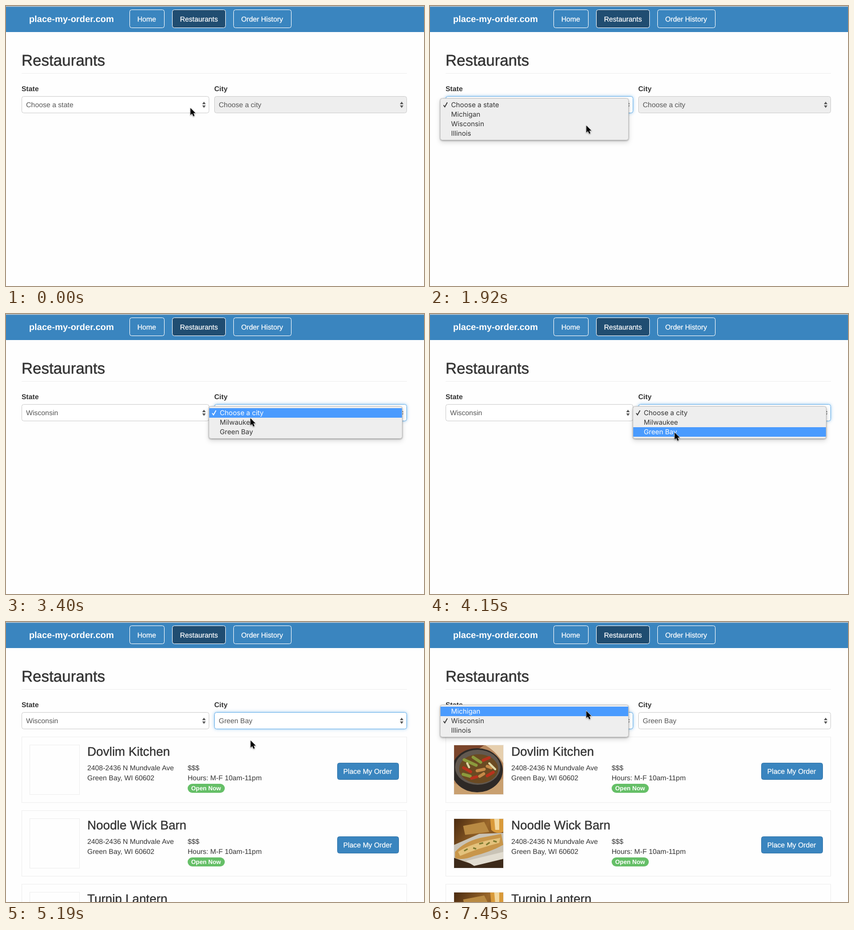
An HTML page that plays this animation: 833 px wide and 559 px high, repeating every 8 s.

```html
<!DOCTYPE html>
<html lang="en">
<head>
<meta charset="utf-8">
<title>Restaurants</title>
<style>
  html, body { margin: 0; width: 100%; height: 100%; overflow: hidden; background: #fefefe; }
  svg { display: block; width: 833px; height: 559px; }
  text { font: 14px "Liberation Sans", Arial, sans-serif; fill: #333; text-rendering: geometricPrecision; white-space: pre; }
  .bold { font-weight: 700; }
  .brand { font-size: 17.8px; font-weight: 700; fill: #fff; }
  .light { fill: #fff; stroke: #fff; stroke-width: .25px; }
  .h1 { font-size: 30.9px; stroke: #333; stroke-width: .5px; }
  .h3 { font-size: 24.7px; stroke: #333; stroke-width: .4px; }
  .value { fill: #555; }
  .badge { font-size: 12px; font-weight: 700; fill: #fff; }
  .item { font: 13.5px Inter, sans-serif; }
  .focus { stroke: #66afe9; filter: drop-shadow(0 0 3px rgba(102, 175, 233, .65)); }
  .panel { filter: drop-shadow(0 1px 1.5px rgba(0, 0, 0, .35)) drop-shadow(0 4px 5px rgba(0, 0, 0, .14)); }
  #cursor { filter: drop-shadow(0 1px 1px rgba(0, 0, 0, .4)); }
</style>
</head>
<body>
<svg id="stage" viewBox="0 0 833 559" xmlns="http://www.w3.org/2000/svg">
  <defs>
    <linearGradient id="wood" x2="1" y2=".6">
      <stop offset="0" stop-color="#4a2a10"/>
      <stop offset=".55" stop-color="#9a672a"/>
      <stop offset="1" stop-color="#5d3512"/>
    </linearGradient>
    <clipPath id="crop"><rect width="98" height="98"/></clipPath>
    <g id="stew" clip-path="url(#crop)">
      <rect width="98" height="98" fill="#b98a60"/>
      <path d="M0 0H60L30 20 0 40Z" fill="#7b452b"/>
      <path d="M62 0H98V36Q84 12 62 0Z" fill="#e6cfae"/>
      <path d="M0 76Q50 104 98 66V98H0Z" fill="#c9a070"/>
      <ellipse cx="46" cy="50" rx="51" ry="44" fill="#2e2926"/>
      <ellipse cx="47" cy="44" rx="45" ry="35" fill="#625950"/>
      <ellipse cx="49" cy="47" rx="39" ry="29" fill="#6b4a22"/>
      <g fill="none" stroke-width="6" stroke-linecap="round">
        <path d="M20 29L44 40M38 24L53 34M18 58L32 62" stroke="#8b9a3c"/>
        <path d="M19 45L33 53M58 30L70 25M66 61L78 54M35 66L45 63" stroke="#b8321d"/>
        <path d="M46 51L60 48M51 62L59 57M66 42L74 45" stroke="#c58a48"/>
        <path d="M70 36L82 48M26 36L30 44" stroke="#dfd8a6" stroke-width="4"/>
      </g>
    </g>
    <g id="bread" clip-path="url(#crop)">
      <rect width="98" height="98" fill="url(#wood)"/>
      <path d="M18 14L60 6 70 26 22 32Z" fill="#b98a43"/>
      <path d="M72 0H98V26Q84 32 74 22Z" fill="#d99a3a"/>
      <path d="M80 0H90V22H82Z" fill="#f3d9a0"/>
      <path d="M0 52L50 30 98 28V80L40 92 0 78Z" fill="#c9c3b6"/>
      <path d="M0 78L40 92 98 78V98H0Z" fill="#3d2a1a"/>
      <path d="M24 84L98 66V80L40 94Z" fill="#e2ddd1"/>
      <path d="M2 66Q20 46 52 38L94 30 98 52Q72 66 40 74 16 84 2 78Z" fill="#c8964a"/>
      <path d="M8 66Q34 48 92 38L90 48Q50 58 12 74Z" fill="#e3c27c"/>
      <path d="M20 64l7-4M38 58l6 2M50 50l8-2M64 52l7-5M78 44l7 2" stroke="#7e7a30" stroke-width="3"/>
    </g>
  </defs>
</svg>
<script>
const NS = 'http://www.w3.org/2000/svg';
const stage = document.getElementById('stage');
const LOOP = 8000, ROW = 19, BLUE = '#3a85bf';

function add(parent, tag, attrs, content = '') {
  const el = document.createElementNS(NS, tag);
  for (const key in attrs) el.setAttribute(key, attrs[key]);
  el.textContent = content;
  return parent.appendChild(el);
}
const label = (parent, x, y, content, cls = '') => add(parent, 'text', { x, y, class: cls }, content);
const rect = (parent, x, y, width, height, fill) => add(parent, 'rect', { x, y, width, height, fill });
// Box with a crisp one-pixel border inside its bounds.
const box = (parent, x, y, w, h, fill, stroke, rx = 0) =>
  add(parent, 'rect', { x: x + .5, y: y + .5, width: w - 1, height: h - 1, fill, stroke, rx });

function drawHeader() {
  rect(stage, 0, 0, 833, 52, BLUE);
  rect(stage, 0, 0, 833, 1.5, '#c3c9ce');
  label(stage, 46, 32, 'place-my-order.com', 'brand');
  [['Home', 246, 70], ['Restaurants', 331, 107], ['Order History', 453, 116]].forEach(([name, x, w], i) => {
    box(stage, x, 7, w, 37, i === 1 ? '#204d71' : 'none', '#fff', 4);
    label(stage, x + 15.7, 31, name, 'light');
  });
  label(stage, 31, 119, 'Restaurants', 'h1');
  rect(stage, 31, 134, 768, 1, '#eee');
}

function makeSelect(x, w, title) {
  label(stage, x, 170, title, 'bold');
  const frame = box(stage, x, 180, w, 34, '#fff', '#ccc', 4);
  const value = label(stage, x + 9, 202, '', 'value');
  const r = x + w;
  add(stage, 'path', { d: `M${r - 14} 196l3.5-5 3.5 5zM${r - 14} 198.5l3.5 5 3.5-5z`, fill: '#555' });
  return { frame, value };
}

function makeCards() {
  const cards = add(stage, 'g', {});
  const pictures = [];
  ['Dovlim Kitchen', 'Noodle Wick Barn', 'Turnip Lantern'].forEach((name, i) => {
    const g = add(cards, 'g', { transform: `translate(31 ${229 + i * 147})` });
    box(g, 0, 0, 768, 132, 'none', '#eee');
    box(g, 16, 16, 100, 100, 'none', '#eee');
    pictures.push(add(g, 'use', { href: i ? '#bread' : '#stew', x: 0, y: 0, transform: 'translate(17 17)' }));
    label(g, 131, 38, name, 'h3');
    label(g, 131, 67, '2408-2436 N Mundvale Ave');
    label(g, 131, 87, 'Green Bay, WI 60602');
    label(g, 331, 67, '$$$');
    label(g, 331, 87, 'Hours: M-F 10am-11pm');
    add(g, 'rect', { x: 331, y: 94, width: 74, height: 18, rx: 9, fill: '#65bf67' });
    label(g, 338, 107, 'Open Now', 'badge');
    box(g, 629, 52, 123, 34, BLUE, '#3274a8', 4);
    label(g, 641, 74, 'Place My Order', 'light');
  });
  return { cards, pictures };
}

function makeMenu(x, top, w, items, checked) {
  const g = add(stage, 'g', {});
  const panel = box(g, x, top - 4, w, items.length * ROW + 8, '#eee', '#c4c4c4', 4);
  panel.setAttribute('class', 'panel');
  const bar = rect(g, x + 1, top, w - 2, ROW, '#4a9bfe');
  const texts = items.map((item, i) => label(g, x + 22, top + 14 + i * ROW, item, 'item'));
  const mark = add(g, 'path', {
    d: `M${x + 7} ${top + 10 + checked * ROW}l2.5 3.5 5-9`, fill: 'none', 'stroke-width': 1.7
  });
  return (visible, hot, alpha) => {
    g.style.display = visible ? '' : 'none';
    g.style.opacity = alpha;
    bar.style.display = hot < 0 ? 'none' : '';
    bar.setAttribute('y', top + hot * ROW);
    texts.forEach((el, i) => el.style.fill = i === hot ? '#fff' : '#333');
    mark.setAttribute('stroke', hot === checked ? '#fff' : '#333');
  };
}

drawHeader();
const selects = { state: makeSelect(31, 374, 'State'), city: makeSelect(415, 384, 'City') };
const { cards, pictures } = makeCards();
const states = ['Michigan', 'Wisconsin', 'Illinois'];
const menus = {
  state: makeMenu(20, 188, 376, ['Choose a state', ...states], 0),
  city: makeMenu(404, 188, 386, ['Choose a city', 'Milwaukee', 'Green Bay'], 0),
  again: makeMenu(20, 169, 376, states, 1)
};
const cursor = add(stage, 'path', {
  id: 'cursor', d: 'M0 0V14.2L3.3 11.2 5.7 16.6 8.2 15.5 5.9 10.3H10.2Z',
  stroke: '#fff', 'stroke-width': 1.1, 'paint-order': 'stroke'
});

// Each step changes only what it names: [ms, cursor x, cursor y, changes]
const start = {
  menu: '', hot: -1, alpha: 1, focus: '', enabled: false, listed: false, loaded: false,
  state: 'Choose a state', city: 'Choose a city'
};
const steps = [
  [0, 367.5, 203.5],
  [150, 373, 203],
  [450, 373, 203, { menu: 'state', hot: 0, focus: 'state' }],
  [600, 367, 205],
  [740, 354, 211, { hot: 1 }],
  [890, 339, 218],
  [1030, 328.5, 223.5],
  [1180, 321, 230, { hot: 2 }],
  [1320, 314, 236],
  [1470, 311.5, 238.5],
  [1920, 311.5, 238.5, { hot: -1 }],
  [2070, 311.5, 238.5, { hot: 2, alpha: .6 }],
  [2220, 311.5, 238.5, { alpha: .1 }],
  [2360, 311.5, 238.5, { menu: '', alpha: 1, enabled: true, state: 'Wisconsin' }],
  [2660, 289, 239],
  [2800, 420, 221],
  [2950, 487, 208],
  [3400, 487, 208, { menu: 'city', hot: 0, focus: 'city' }],
  [3550, 487, 208, { hot: 1 }],
  [3850, 487, 216],
  [4000, 487, 229, { hot: 2 }],
  [4150, 487.5, 236.5],
  [4900, 487.5, 236.5, { hot: -1 }],
  [5050, 487.5, 236.5, { hot: 2, alpha: .5 }],
  [5190, 487.5, 236.5, { menu: '', alpha: 1, city: 'Green Bay', listed: true }],
  [5330, 487.5, 236.5, { loaded: true }],
  [6380, 409.5, 230.5],
  [6530, 352, 211],
  [6670, 322, 201],
  [6820, 312, 198],
  [7000, 311.5, 197.5, { menu: 'again', hot: 1, focus: 'state' }],
  [7150, 311.5, 197.5],
  [7450, 311.5, 177.5, { hot: 0 }]
];
let last = start;
const poses = steps.map(([t, x, y, change]) => last = { ...last, ...change, t, x, y });

const show = (el, on) => el.style.display = on ? '' : 'none';

function render(p) {
  for (const key in selects) {
    const { frame, value } = selects[key];
    value.textContent = p[key];
    frame.setAttribute('class', p.focus === key ? 'focus' : '');
  }
  selects.city.frame.setAttribute('fill', p.enabled ? '#fff' : '#eee');
  for (const key in menus) menus[key](p.menu === key, p.hot, p.alpha);
  show(cards, p.listed);
  pictures.forEach(el => show(el, p.loaded));
  cursor.setAttribute('transform', `translate(${p.x} ${p.y})`);
}

const origin = performance.now();
let current;
function tick() {
  const t = (performance.now() - origin) % LOOP;
  const pose = poses.findLast(p => p.t <= t) || poses[0];
  if (pose !== current) render(current = pose);
  requestAnimationFrame(tick);
}
tick();
</script>
</body>
</html>
```
